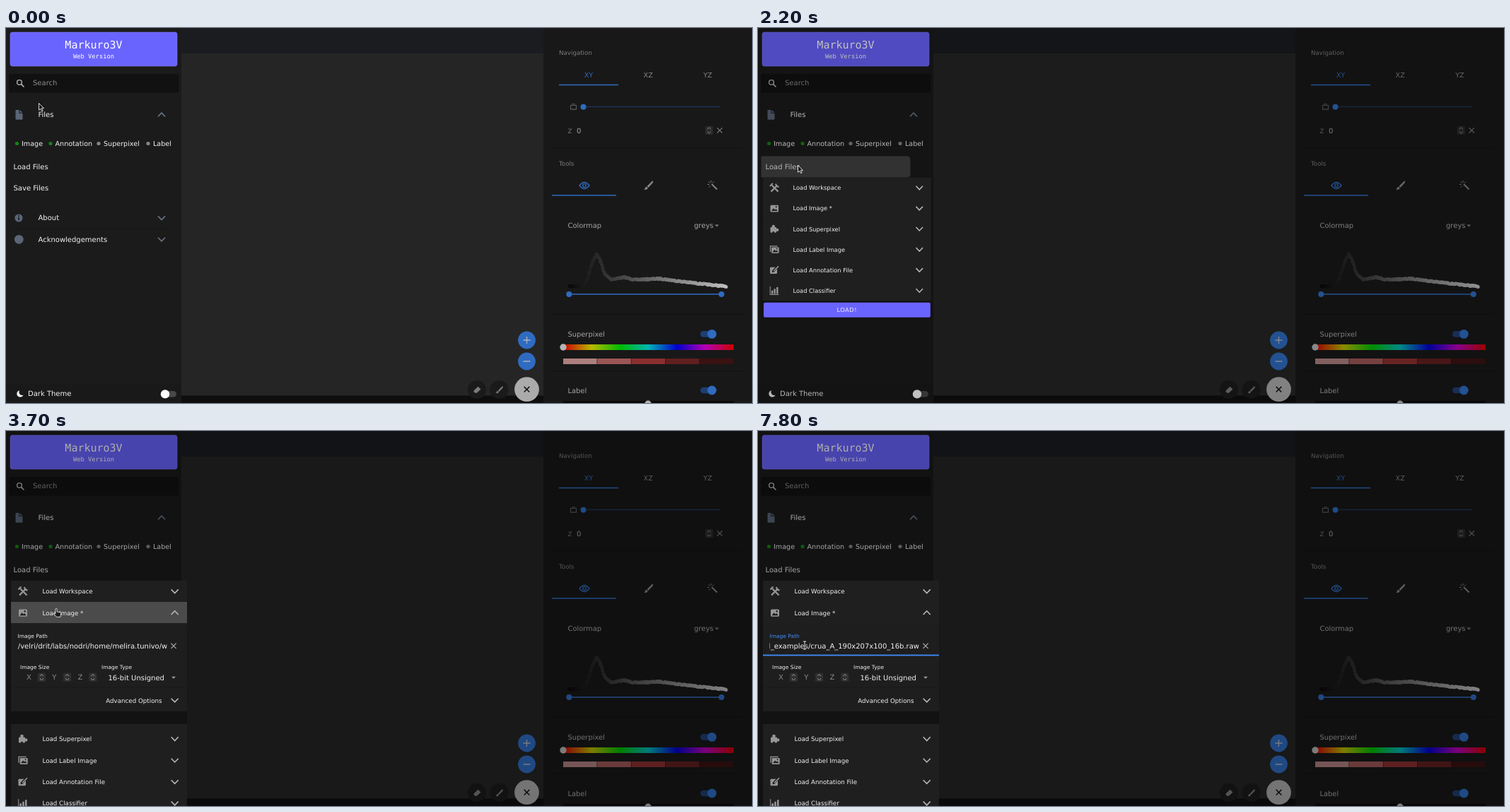
An HTML page for the animation above (8 s loop, 1055x531 px).

```html
<!DOCTYPE html>
<html lang="en">
<head>
<meta charset="utf-8">
<title>Image loading walkthrough</title>
<style>
  html, body { margin: 0; width: 100%; height: 100%; overflow: hidden; background: #181818; }
  svg { display: block; width: 1055px; height: 531px; }
  text { font-family: "DejaVu Sans", sans-serif; text-rendering: geometricPrecision; white-space: pre; user-select: none; }
  .mono { font-family: "DejaVu Sans Mono", monospace; }
</style>
</head>
<body>
<svg id="stage" viewBox="0 0 1055 531" xmlns="http://www.w3.org/2000/svg"></svg>
<script>
const BLUE = '#2f6bc0', FOCUS = '#428cff', PURPLE = '#6a64ff', SLATE = '#5a6577';
const LIGHT = '#f2f2f2', DIM = '#a6a6a6', GREY = '#7c7c7c';

const rect = (x, y, w, h, fill, rx = 0, more = '') =>
  `<rect x="${x}" y="${y}" width="${w}" height="${h}" rx="${rx}" fill="${fill}" ${more}/>`;
const dot = (x, y, r, fill) => `<circle cx="${x}" cy="${y}" r="${r}" fill="${fill}"/>`;
const text = (x, y, s, size = 10, fill = LIGHT, more = '') =>
  `<text x="${x}" y="${y}" font-size="${size}" fill="${fill}" ${more}>${s}</text>`;
const line = (d, stroke, w = 1.5, more = '') =>
  `<path d="${d}" fill="none" stroke="${stroke}" stroke-width="${w}" ${more}/>`;
const shape = (d, fill, more = '') => `<path d="${d}" fill="${fill}" ${more}/>`;
const group = (id, body, more = '') => `<g id="${id}" ${more}>${body}</g>`;
const at = (x, y, body) => `<g transform="translate(${x} ${y})">${body}</g>`;

const chevron = (x, y, color, dir = 1) =>
  line(`M${x - 5} ${y - 2.6 * dir}L${x} ${y + 2.6 * dir}L${x + 5} ${y - 2.6 * dir}`, color, 1.6);
const cross = (x, y, r, color, w = 1.2) =>
  line(`M${x - r} ${y - r}l${2 * r} ${2 * r}m0 ${-2 * r}l${-2 * r} ${2 * r}`, color, w);
const caret = (x, y, color) => shape(`M${x - 3} ${y - 1.5}h6l-3 3z`, color);
const stepper = (x, y, fill, mark) => rect(x - 5.5, y - 6, 11, 12, fill, 1.5) +
  line(`M${x - 2.5} ${y - 1.7}l2.5 -2.4l2.5 2.4m-5 3.4l2.5 2.4l2.5 -2.4`, mark, 1);
const toggle = (y) => rect(982, y - 4.3, 20, 8.6, '#1e3f73', 4.3) + dot(998.3, y, 6.4, BLUE);

const brush = (c) =>
  shape('M6 -6.5q1.5 1 0 3l-6 6.5l-2 -2l6.5 -6.5q.8 -1.2 1.5 -1z', c) +
  shape('M-2.6 1.7l2 2q-1 3 -5.7 2.2q1.5 -.8 1.5 -2.2q.5 -1.9 2.2 -2z', c);

function sidebar() {
  const status = [[15.5, 22, 'Image', 1], [63, 69.5, 'Annotation', 1],
                  [131, 138, 'Superpixel', 0], [201, 208, 'Label', 0]];
  return rect(0, 0, 248, 531, '#1b1b1b') +
    rect(6, 6, 236, 48, PURPLE, 3, 'stroke="#827dff" stroke-width=".6"') +
    text(124, 29, 'Markuro3V', 15, '#fff', 'class="mono" text-anchor="middle"') +
    text(124, 42.5, 'Web Version', 8.75, '#fff', 'class="mono" text-anchor="middle"') +
    rect(4, 65, 240.5, 26.5, '#111', 2) +
    line('M21.6 79.6l3.9 3.9', '#b5b5b5', 1.6) +
    `<circle cx="19" cy="77" r="3.4" fill="none" stroke="#b5b5b5" stroke-width="1.4"/>` +
    text(38, 81.3, 'Search', 10, '#8d8d8d') +
    rect(4.5, 108, 239.5, 29.5, '#272727', 3, 'id="filesHover"') +
    shape('M13.5 116h5v5h5v7.8q0 1 -1 1h-8q-1 0 -1 -1zM19.6 116.2l3.8 3.8h-3.8z', SLATE) +
    text(45.5, 126.4, 'Files') + chevron(220, 122.8, '#697586', -1) +
    status.map(([cx, x, s, on]) =>
      dot(cx, 163.5, 2.6, on ? '#148214' : '#858585') + text(x, 167, s, 9.6)).join('') +
    shape('M4.5 181.5h206q5 0 5 5v20q0 5 -5 5h-206z', '#424242', 'id="loadHover"') +
    text(10.5, 199.9, 'Load Files') + text(10.5, 229.5, 'Save Files') +
    rect(6, 245.5, 231, .7, '#181818') + rect(6, 284, 231, .7, '#181818') +
    dot(18, 269, 5.6, SLATE) + rect(17.2, 268, 1.7, 4, '#1b1b1b') + dot(18, 266, 1, '#1b1b1b') +
    text(45.5, 272.4, 'About') + chevron(220, 269, '#697586') +
    dot(18.3, 299.3, 6.4, SLATE) +
    text(45.5, 302.8, 'Acknowledgements') + chevron(220, 299.3, '#697586') +
    rect(0, 504, 248, 27, '#191919') +
    shape('M19 513.2a4.8 4.8 0 1 0 5.5 6.6a4.6 4.6 0 0 1 -5.5 -6.6z', LIGHT) +
    text(31, 521.4, 'Dark Theme') +
    rect(222, 514, 19, 8.8, '#484848', 4.4) + dot(225, 518.4, 6.2, '#fff');
}

function viewer() {
  return rect(248, 0, 512, 37, '#1a1c20') + rect(248, 36, 512, 485, '#252525') +
    rect(248, 520.5, 512, 11, '#0e0e0e') +
    dot(666, 512, 13, '#1a1a1a') + dot(697.5, 512, 13, '#1a1a1a') +
    shape('M662 513l5.5 -5.2l4 3.6l-5.6 5.4h-2.6l-2 -2z', GREY) +
    at(697.5, 512.5, `<g transform="scale(.8)">${brush(GREY)}</g>`) +
    dot(736.5, 442, 12.4, BLUE) + dot(736.5, 472, 12.4, BLUE) +
    line('M731.5 442h10m-5 -5v10M731.5 472h10', '#adb4c0', 1.3) +
    dot(736.5, 511.7, 17.4, '#ababab') + cross(736.5, 511.7, 3.8, '#111', 1.5);
}

// Dotted grey curve under the colour map controls.
function histogram() {
  const pts = [[797, 366], [814, 365], [820, 360], [826, 343], [832, 325], [836, 321], [841, 331],
    [847, 349], [856, 356], [874, 353], [889, 356.5], [925, 355], [955, 359], [990, 363], [1019, 366]];
  let seed = 7, out = '';
  const rnd = () => (seed = seed * 16807 % 2147483647) / 2147483647 - .5;
  for (let x = 797, i = 0; x <= 1019; x += .9) {
    while (i < pts.length - 2 && x > pts[i + 1][0]) i++;
    const [ax, ay] = pts[i], [bx, by] = pts[i + 1];
    const y = ay + (by - ay) * (x - ax) / (bx - ax);
    const g = Math.round(10 + 180 * (x - 797) / 222);
    const wild = x > 815 && x < 845 ? 4 : 1.6;
    out += dot(x.toFixed(1), (y + rnd() * wild).toFixed(1), 2.4, `rgb(${g},${g},${g})`);
  }
  return out;
}

function tools() {
  const swatch = ['#ad7f7f', '#9c5555', '#8a2f2f', '#5f1f1f', '#3a1212'];
  const stops = ['#c00', '#b8b800', '#0b0', '#00b4b4', '#00c', '#b400b4', '#c00']
    .map((c, i) => `<stop offset="${i / 6}" stop-color="${c}"/>`).join('');
  return `<defs><linearGradient id="hue">${stops}</linearGradient></defs>` +
    rect(760, 0, 295, 531, '#181818') +
    [169, 404.5, 485].map(y => rect(772, y, 270, 1, '#111')).join('') +
    text(782, 38, 'Navigation', 8.7, GREY) +
    ['XY', 'XZ', 'YZ'].map((s, i) => text(824 + 84.2 * i, 70, s, 9.6, i ? '#858585' : BLUE,
      'text-anchor="middle"')).join('') +
    rect(782, 79.8, 84, 1.5, BLUE) +
    line('M798.5 109.5h8v5.6h-8zM800 107.8h5', '#5c5c5c', 1.1) +
    rect(816, 110.8, 194, 1.4, '#1d355c') + dot(816.5, 111.7, 4, BLUE) +
    text(794.5, 148.6, 'Z', 8.7, '#777') + text(807, 148.8, '0', 10, DIM) +
    stepper(994.3, 145, '#2b2b2b', '#8a8a8a') + cross(1009.3, 145, 3.6, GREY) +
    text(782, 195, 'Tools', 8.7, GREY) +
    line('M811 223q7 -9 14 0q-7 9 -14 0z', BLUE, 1.3) +
    `<circle cx="818" cy="223" r="2.3" fill="none" stroke="${BLUE}" stroke-width="1.3"/>` +
    at(908.5, 223, brush('#858585')) +
    line('M998 221l7.5 7.5', '#858585', 2) +
    line('M997 216v2.5M993.5 217.5l2 2M992 221.5h2.5M1001 217.5l-2 2M994 225.5l2 -2', '#858585', 1) +
    rect(772, 236.2, 91, 1.5, BLUE) +
    text(794.5, 283.4, 'Colormap', 9.9, DIM) + text(973, 283.4, 'greys', 10, DIM) +
    caret(1005.3, 280, GREY) + histogram() +
    rect(796, 376.2, 216, 1.5, BLUE) + dot(796.3, 376.9, 4, BLUE) + dot(1011.8, 376.9, 4, BLUE) +
    text(794.5, 437, 'Superpixel', 9.9, DIM) + toggle(433.4) +
    rect(788, 448, 241, 8, 'url(#hue)') + dot(788, 452, 4.7, '#b5b5b5') +
    swatch.map((c, i) => rect(788 + 48.2 * i, 468, 47.6, 8, c)).join('') +
    text(794.5, 516.6, 'Label', 9.9, DIM) + toggle(513) +
    rect(788, 528.2, 241, 3, '#080808') + dot(908, 532.2, 4.7, '#b5b5b5');
}

const ICON = '#969696';
const icons = [
  line('M-5 5.5L4 -3.5M-3.5 -3.5L5.5 5.5', ICON, 2.4) + line('M-6.5 -2.5l4 -4M2 -6q.5 4 4.5 4.5', ICON, 2.2),
  rect(-6, -5, 12, 10.4, ICON, 1.5) + shape('M-4.5 3.8l3 -4l2.3 2.3l1.7 -1.6l2 3.3z', '#1f1f1f') + dot(2.7, -2.2, 1.2, '#1f1f1f'),
  rect(-6, -2.5, 9, 8, ICON, 1) + dot(-1.5, -3.8, 2.3, ICON) + dot(4.2, 1.5, 2.2, ICON) + dot(-1.5, 5.4, 1.6, '#1f1f1f'),
  line('M-6 3.5v-8.5h10.5', ICON, 1.3) + rect(-4.3, -3.3, 11, 9, ICON, 1.2) + shape('M-3 4l3 -3.8l2 2l1.4 -1.2l2 3z', '#1f1f1f') + dot(3.6, -1, 1, '#1f1f1f'),
  shape('M-5.5 -4h7l-4.5 4.5l-.6 3l3 -.6l4.6 -4.6v6q0 1.2 -1.2 1.2h-8.3q-1 0 -1 -1.2v-7.3q0 -1 1 -1z', ICON) + line('M-1 1.5L6 -5.5', ICON, 1.6),
  line('M-6.3 -6v12h12.8', ICON, 1.1) + rect(-4.5, 0, 2.5, 5, ICON) + rect(-.8, -2.5, 2.5, 7.5, ICON) + rect(3, -5, 2.5, 10, ICON)
];
const names = ['Workspace', 'Image *', 'Superpixel', 'Label Image', 'Annotation File', 'Classifier'];
const ROW = 30.45;

function row(i) {
  const y = 227 + ROW * i;
  return at(24, y, icons[i]) + text(51.5, y + 3.2, 'Load ' + names[i], 8.7) +
    (i === 1 ? '<path id="imageChevron" fill="none" stroke="#b8b8b8" stroke-width="1.6"/>'
             : chevron(238.7, y, '#b8b8b8'));
}

function imageForm() {
  return rect(7, 272, 249, 125, '#1e1e1e') +
    text(16.5, 292.9, 'Image Path', 7.5, LIGHT, 'id="pathLabel"') +
    rect(16.5, 298, 211.5, 13, '#5f786e', 0, 'id="selection"') +
    group('pathText',
      text(16.8, 307.6, '/velri/drit/labs/nodri/home/melira.tunivo/w', 10, LIGHT, 'id="oldPath"') +
      text(228, 307.6, 'd_examples/crua_A_190x207x100_16b.raw', 10, LIGHT, 'id="newPath" text-anchor="end"'),
      'clip-path="url(#field)"') +
    rect(227, 298, 1, 13, LIGHT, 0, 'id="textCaret"') + cross(237, 304.3, 3.6, '#b0b0b0') +
    rect(7, 316.6, 249, 1.8, FOCUS, 0, 'id="focusLine"') +
    text(20, 336.8, 'Image Size', 7.5) + text(135, 336.8, 'Image Type', 7.5) +
    ['X', 'Y', 'Z'].map((s, i) => text(29 + 36.2 * i, 352.3, s, 10, '#8a8a8a') +
      stepper(50.4 + 36.2 * i, 348.7, '#303030', '#a0a0a0')).join('') +
    text(144.5, 353, '16-bit Unsigned') + caret(237, 349.3, '#a0a0a0') +
    rect(7, 362.5, 249, .8, '#191919') +
    text(141.3, 385.4, 'Advanced Options', 8.7) + chevron(238.7, 381.3, '#b8b8b8');
}

function popover() {
  return `<defs><clipPath id="field"><rect x="16.4" y="296" width="211.4" height="18"/></clipPath>
    <clipPath id="formClip"><rect id="formBox" x="7" y="272" width="249" height="0"/></clipPath></defs>` +
    rect(7, 212, 249, 209, '#121212', 2, 'id="panel"') +
    rect(7, 212, 249, 60.6, '#1f1f1f') + rect(7, 211.8, 249, 30, '#292929', 0, 'id="hover0"') +
    rect(7, 242, 249, 30.2, '#292929', 0, 'id="hover1"') + row(0) + row(1) +
    group('form', imageForm(), 'clip-path="url(#formClip)"') +
    group('rest', rect(7, 272.4, 249, 122, '#1f1f1f', 0, 'id="restBack"') + [2, 3, 4, 5].map(row).join('') +
      rect(8, 397, 247, 22, PURPLE, 2) +
      text(131.3, 411.2, 'LOAD!', 8.7, LIGHT, 'text-anchor="middle" letter-spacing=".5"'));
}

const outline = 'stroke="#e8e8e8" stroke-width=".9" stroke-linejoin="round"';
const cursors = {
  arrow: shape('M.5 .5v9.8l2.4 -2l1.6 3.4l1.6 -.7l-1.6 -3.4h3z', '#1a1a1a', outline),
  hand: shape('M3 8V1.4a1.1 1.1 0 0 1 2.2 0V5L9.4 5.9q1.4 .4 1.2 2L10 12.3H4.6L1 8.6Q.4 7 1.8 7.2z', '#1a1a1a', outline),
  beam: line('M-2.5 -5.5h5M0 -5.5v11M-2.5 5.5h5', '#111', 2.4) + line('M-2.2 -5.5h4.4M0 -5.5v11M-2.2 5.5h4.4', '#eee', 1)
};

document.getElementById('stage').innerHTML =
  viewer() + tools() + sidebar() +
  rect(0, 0, 1055, 531, '#000', 0, 'id="backdrop"') + group('popover', popover()) +
  Object.keys(cursors).map(k => group(k, cursors[k])).join('');

const $ = id => document.getElementById(id);
const set = (id, attrs) => { for (const k in attrs) $(id).setAttribute(k, attrs[k]); };
const show = (id, on) => set(id, { visibility: on ? 'inherit' : 'hidden' });
const ramp = (t, a, b) => Math.min(1, Math.max(0, (t - a) / (b - a)));

// Pointer moves: start, end, kind, from and to positions.
const moves = [
  [0, 0, 'arrow', 46, 106, 46, 106],
  [200, 200, 'hand', 49, 117, 49, 117],
  [600, 700, 'hand', 49, 126, 49, 135],
  [1000, 1200, 'hand', 54, 134, 63.5, 129.5],
  [1400, 1500, 'hand', 69, 128, 69, 139],
  [1600, 1900, 'hand', 67, 151, 56, 190],
  [2200, 2200, 'arrow', 56, 194, 56, 194],
  [2600, 3200, 'hand', 61, 215.5, 67, 249],
  [3400, 3700, 'hand', 67, 249, 67, 251],
  [3800, 4000, 'hand', 67, 253, 67, 257],
  [4600, 4700, 'beam', 66, 297, 66, 303.5]
];

function pointer(t) {
  const [a, b, kind, x0, y0, x1, y1] = moves.filter(m => m[0] <= t).pop();
  const p = b > a ? ramp(t, a, b) : 1;
  for (const k in cursors) show(k, k === kind);
  set(kind, { transform: `translate(${x0 + (x1 - x0) * p} ${y0 + (y1 - y0) * p})` });
}

function draw(ms) {
  const t = Math.floor(ms / 100) * 100;
  pointer(t);
  show('filesHover', t >= 200 && t < 1500);
  show('loadHover', t >= 1800 && t < 2600);

  const open = 1 - Math.pow(1 - ramp(t, 2000, 2400), 2.15);
  const scale = .8 + .2 * open;
  set('backdrop', { opacity: .32 * open });
  show('popover', open > 0);
  set('popover', {
    opacity: ramp(open, 0, .7),
    transform: `translate(7 212) scale(${scale}) translate(-7 -212)`
  });

  const grow = 1 - Math.pow(1 - ramp(t, 3300, 3600), 2);
  const press = ramp(t, 3300, 3600) * (1 - ramp(t, 3700, 4100));
  const tone = Math.round(41 + 34 * press);
  show('hover0', t >= 2700 && t < 3100);
  show('hover1', t >= 3100 && t < 4600);
  set('hover1', { fill: `rgb(${tone},${tone},${tone})` });
  const c = 2.6 * (1 - 2 * grow);
  set('imageChevron', { d: `M233.7 ${257.4 - c}L238.7 ${257.4 + c}L243.7 ${257.4 - c}` });
  set('formBox', { height: 125 * grow });
  set('rest', { transform: `translate(0 ${148 * grow})` });
  set('restBack', { y: 272.4 - 5.4 * grow, height: 122 + 5.4 * grow });
  set('panel', { height: 209 + 148 * grow });

  const focus = t >= 4700;
  set('pathLabel', { fill: focus ? FOCUS : LIGHT });
  show('focusLine', focus);
  show('selection', t >= 4900 && t < 6600);
  show('oldPath', t < 6600);
  show('newPath', t >= 6600);
  show('textCaret', t >= 6600 && t < 7800);
}

function tick() {
  draw(performance.now() % 8000);
  requestAnimationFrame(tick);
}
tick();
</script>
</body>
</html>
```
